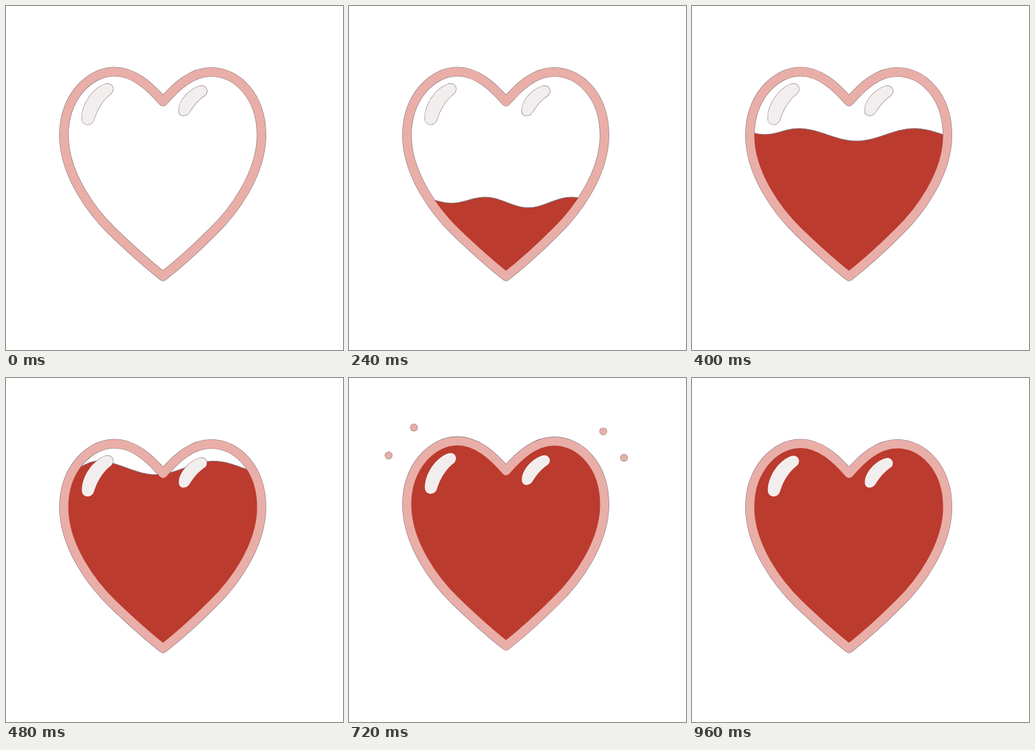
These frames come from a looping animation (500 by 511 pixels, 1440 ms). An HTML page with a canvas:

```html
<!DOCTYPE html>
<html lang="en">
<head>
<meta charset="utf-8">
<title>Filling heart</title>
<style>
html, body { margin: 0; height: 100%; overflow: hidden; background: #fff; }
canvas { display: block; }
</style>
</head>
<body>
<canvas id="stage" width="500" height="511"></canvas>
<script>
const ctx = document.getElementById('stage').getContext('2d');
const RED = '#bb3b2e', PINK = '#e9aea8', SHINE = '#f3eeee', RIM = 'rgba(70,40,50,.65)';
const STEP = 80, LOOP = 1440, LAST = 12, BURST = 8;

const heart = new Path2D(`M233 142 C214 120 190 97.5 161 97.5 C123 97.5 86 136 86 192
  C86 250 128 306 158 335 C183 359 212 385 233 401.5 C254 385 283 359 307 335
  C337 306 379 250 379 192 C379 134 343 98 304 98 C275 98 252 120 233 142Z`);
const shines = new Path2D(`M147 116 C156 113 163 122 156 130 C145 138 136 151 130 170
  C126 179 112 178 112.5 166 C113 146 128 123 147 116Z
  M286 119.5 C295 116 301.5 125 296 132 C286 139 280 145 272 158
  C266 166 255 164 256.5 153 C258 139 272 124 286 119.5Z`);

// Start and heading in degrees of each flying drop
const drops = [[73.5, 122.5, -153], [107.5, 85.5, -133], [365.5, 91, -45], [394.5, 128, -35]];

// The surface rises while its main crest drifts left and its right side widens
function liquid(n) {
  const u = n / 2 - 1;
  const crest = 224 - 44 * u, top = 328 - 82 * u - 10 * u * u;
  const left = { half: 50, depth: 6 + 11 * (u - 1) ** 2 };
  const right = { half: Math.min(46 + 36 * u, 86), depth: 14 + 3 * u };
  const path = new Path2D();
  path.moveTo(0, 520);
  for (let x = 0; x <= 500; x += 2) {
    const { half, depth } = x < crest ? left : right;
    path.lineTo(x, top + depth * (1 - Math.cos(Math.PI * (x - crest) / half)) / 2);
  }
  path.lineTo(500, 520);
  path.closePath();
  return path;
}

function outline(path, color, width) {
  ctx.strokeStyle = color;
  ctx.lineWidth = width;
  ctx.stroke(path);
}

function paint(path, color) {
  ctx.fillStyle = color;
  ctx.fill(path);
}

function drawHeart(n) {
  ctx.save();
  if (n >= BURST) ctx.translate(0, -6 * ((LAST - n) / (LAST - BURST)) ** 1.5);
  outline(heart, RIM, 14);
  outline(shines, RIM, 1.2);
  ctx.save();
  ctx.clip(heart);
  const fill = liquid(Math.min(n, BURST));
  outline(fill, RIM, 2);
  paint(fill, RED);
  ctx.restore();
  outline(heart, PINK, 12.8);
  paint(shines, SHINE);
  ctx.restore();
}

function drawDrops(n) {
  const u = (n - BURST) / 2;
  if (u < 0 || u > 1) return;
  for (const [x, y, deg] of drops) {
    const a = deg * Math.PI / 180, dot = new Path2D();
    dot.arc(x + 33 * u * Math.cos(a), y + 33 * u * Math.sin(a), 4.6 + u, 0, 7);
    outline(dot, RIM, 1.2);
    paint(dot, PINK);
  }
}

function frame() {
  const n = Math.min(LAST, Math.floor(performance.now() % LOOP / STEP));
  ctx.fillStyle = '#fff';
  ctx.fillRect(0, 0, 500, 511);
  drawHeart(n);
  drawDrops(n);
  requestAnimationFrame(frame);
}
ctx.lineJoin = 'round';
frame();
</script>
</body>
</html>
```
